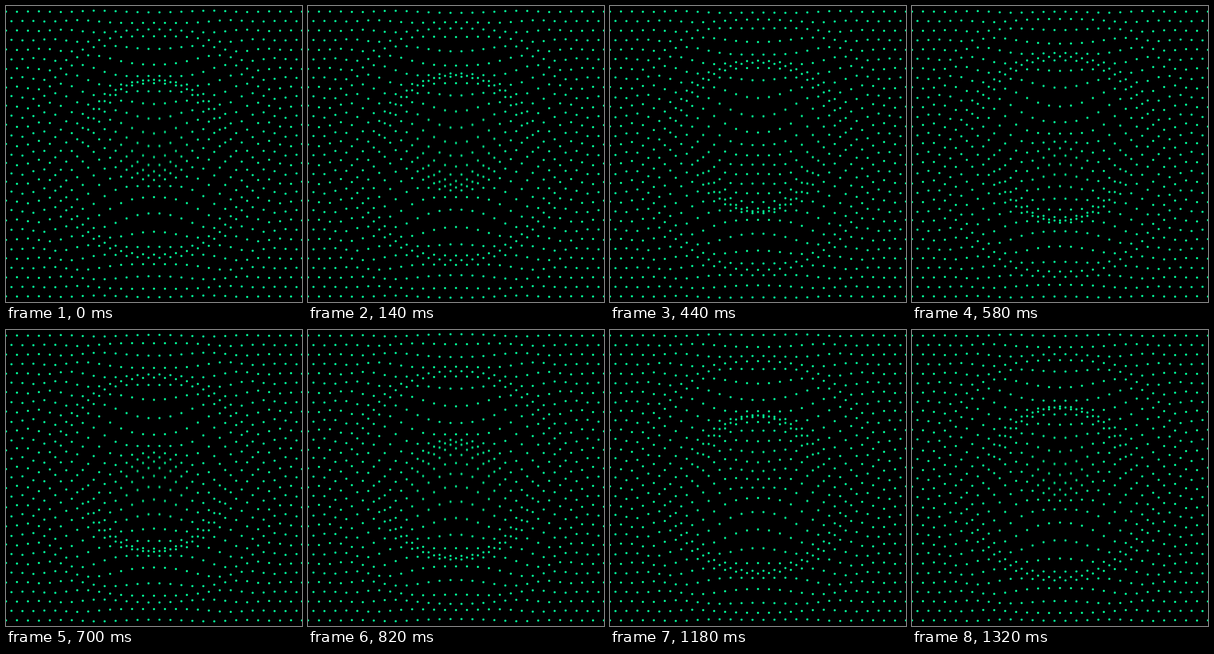
These frames come from a looping animation (540x540 px, 1.34 s). An HTML page with a canvas:

```html
<!DOCTYPE html>
<html lang="en">
<head>
<meta charset="utf-8">
<title>Dot ripple</title>
<style>
  html, body { margin: 0; width: 100%; height: 100%; overflow: hidden; background: #000; }
  canvas { display: block; width: 540px; height: 540px; }
</style>
</head>
<body>
<canvas id="stage" width="540" height="540"></canvas>
<script>
const ctx = document.getElementById('stage').getContext('2d');
const SIZE = 540, CENTER = SIZE / 2;
const LOOP = 1340, STEP = 20;
const GAP = 20, ROW_GAP = GAP * Math.sqrt(3) / 2, ROWS = 15;
const RADIUS = 2, COLOR = '#00ff99';
const HEIGHT = 40, FALLOFF = 0.00004, CHIRP = 0.00018;
const SAMPLES = 8;

// Hexagonal grid; each dot keeps its wave height and phase lag.
const dots = [];
for (let row = -ROWS; row <= ROWS; row++) {
  for (let x = row % 2 ? 0 : GAP / 2; x <= SIZE; x += GAP) {
    const dy = row * ROW_GAP;
    const r2 = (x - CENTER) ** 2 + dy * dy;
    dots.push({ x, y: CENTER + dy, amp: HEIGHT * Math.exp(-FALLOFF * r2), lag: CHIRP * r2 });
  }
}

// Time is stepped, with two longer holds.
function poseTime(ms) {
  const t = Math.floor(ms / STEP) * STEP;
  if (t < 60) return 40;
  if (t === 820) return 840;
  return t;
}

function draw(t) {
  ctx.globalCompositeOperation = 'source-over';
  ctx.globalAlpha = 1;
  ctx.fillStyle = '#000';
  ctx.fillRect(0, 0, SIZE, SIZE);

  // Motion blur: add up moments spread over the last step.
  ctx.globalCompositeOperation = 'lighter';
  ctx.globalAlpha = 1 / SAMPLES;
  ctx.fillStyle = COLOR;
  for (let i = 0; i < SAMPLES; i++) {
    const moment = t - STEP * (i + 0.5) / SAMPLES;
    const angle = 2 * Math.PI * moment / LOOP;
    ctx.beginPath();
    for (const { x, y, amp, lag } of dots) {
      const py = y + amp * Math.sin(angle - lag);
      ctx.moveTo(x + RADIUS, py);
      ctx.arc(x, py, RADIUS, 0, 2 * Math.PI);
    }
    ctx.fill();
  }
}

let start = null, shown = null;
function tick(now) {
  if (start === null) start = now;
  const t = poseTime(Math.max(0, now - start) % LOOP);
  if (t !== shown) draw(shown = t);
  requestAnimationFrame(tick);
}
draw(shown = poseTime(0));
requestAnimationFrame(tick);
</script>
</body>
</html>
```
